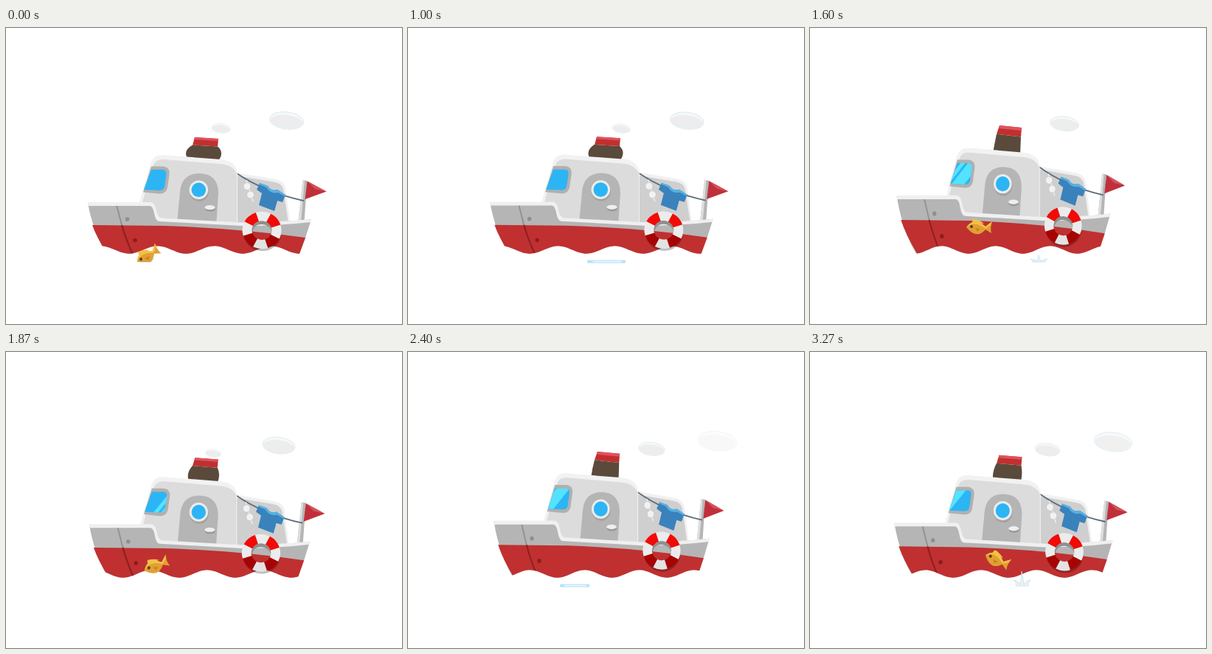
An HTML page that plays this animation: 537x401 px, repeating every 3340 ms.

```html
<!DOCTYPE html>
<html lang="en">
<head>
<meta charset="utf-8">
<title>Little boat</title>
<style>
  html, body { margin: 0; width: 100%; height: 100%; overflow: hidden; background: #fff; }
  svg { display: block; width: 100vw; height: 100vh; }
</style>
</head>
<body>
<svg viewBox="0 0 537 401" xmlns="http://www.w3.org/2000/svg">
  <defs>
    <clipPath id="water"><path id="waves"/></clipPath>
    <clipPath id="glass"><path d="M197 192H212Q218 192 217.500 198L215 215Q214 220 208 220L187 219Z"/></clipPath>
    <clipPath id="above"><rect width="537" height="317"/></clipPath>
    <g id="puff">
      <ellipse rx="1" ry=".5" fill="#f8f8f8" stroke="#c4e4f4" stroke-width=".03"/>
      <ellipse cx=".01" cy=".07" rx=".95" ry=".4" fill="#ededed"/>
    </g>
  </defs>

  <g id="smoke"></g>
  <path id="stack" fill="#5a4a3c"/>
  <path id="cap" fill="#c0302f"/>
  <path id="lip" fill="#e0525e"/>

  <g id="upper">
    <!-- aft deck -->
    <path d="M312 196L366 205Q377 207 379 217L385 262H312Z" fill="#f0f0f0"/>
    <path d="M312 200L363 208.500Q374 210 376 219L383 264H312Z" fill="#cfcfcf"/>
    <!-- flag -->
    <path d="M402.500 206L408.500 207L404.500 261H396.500Z" fill="#b5b5b5"/>
    <path d="M402.500 206H405L400 261H396.500Z" fill="#dedede"/>
    <path d="M408.500 207.500L434.500 221.500L405.500 232Z" fill="#c0303a"/>
    <path d="M408.500 207.500L434.500 221.500L419 218Z" fill="#d4515a"/>
    <!-- washing line -->
    <path d="M313 197Q352 223 404 234" fill="none" stroke="#5b6c78" stroke-width="1.800"/>
    <g fill="#f2f2f2" stroke="#c2c2c2" stroke-width=".7">
      <path d="M326 206L335 235" fill="none" stroke="#efefef" stroke-width="1.600"/>
      <circle cx="327" cy="214.500" r="5"/>
      <circle cx="331.500" cy="226" r="5"/>
    </g>
    <path d="M344 210L355 214Q360 222 368 219L379 226L375 236L368 234L364 248L343 240L347 224L340 219Z" fill="#3a82bc"/>
    <path d="M344 210L355 214Q360 222 368 219L379 226L378 228L369 223Q358 225 353 216L343.500 212Z" fill="#54b2e4"/>
    <!-- cabin -->
    <path d="M180 239L196 184Q200 171 213 172L291 178Q314 180 314 199V268H204Z" fill="#f2f2f2"/>
    <path d="M184 239L199 188Q202 177 214 178L289 184Q307 185 313 197V268H204Z" fill="#dcdcdc"/>
    <path d="M197 187.500H212Q223 188 221.500 199L219 216Q217 225 208 224.500L186 222.500Z" fill="#b0b0b0"/>
    <g clip-path="url(#glass)">
      <rect x="180" y="185" width="45" height="40" fill="#2bb5f5"/>
      <g id="glare" fill="#54e3ff">
        <rect x="-7" y="-40" width="14" height="80"/>
        <rect x="-15" y="-40" width="5" height="80"/>
      </g>
    </g>
    <path d="M232 264L236 222Q238 197 263 197Q288 198 288 224L285 268Z" fill="#b5b5b5"/>
    <circle cx="262" cy="222" r="13" fill="#a3a3a3"/>
    <circle cx="261.300" cy="219.300" r="12.800" fill="#ececec"/>
    <circle cx="261.300" cy="219.300" r="9.800" fill="#2bb5f5"/>
    <ellipse cx="277" cy="245.500" rx="7" ry="3" fill="#999"/>
    <ellipse cx="276.500" cy="243" rx="7" ry="3" fill="#efefef"/>
  </g>

  <g clip-path="url(#water)">
    <g id="hull">
      <path d="M111 237H197Q202 238 204 248Q206 258 211 258L320 264Q370 264 414 259L406 284L395 313H141Q119 282 111 237Z" fill="#b5b5b5"/>
      <path d="M117 267L215 268Q320 271.500 406 284L395 314H143Q124 287 117 267Z" fill="#c03030"/>
      <path d="M150 240L157 267" stroke="#929292" stroke-width="2"/>
      <path d="M157 267Q163 288 174 311" fill="none" stroke="#8f2020" stroke-width="2.200"/>
      <circle cx="164.500" cy="259" r="2.800" fill="#8f8f8f"/>
      <circle cx="175" cy="287.500" r="2.800" fill="#8f1c1c"/>
      <path d="M111 236H197Q202 237 204 247Q206 257 211 257.500L320 263.500Q370 263 414 259L413 263Q370 268 320 268L208 262Q203 262 201 251Q199 241 195 241H111.500Z" fill="#f0f0f0"/>
    </g>
  </g>
  <g id="ring"></g>

  <g id="ripple">
    <rect x="-.5" y="314.500" width="1" height="4" rx=".04" fill="#b5e2f9"/>
    <rect x="-.36" y="315.800" width=".76" height="1.400" rx=".04" fill="#f4fbff"/>
  </g>
  <g fill="#f0f0f0" stroke="#b9dff2" stroke-width=".7">
    <path id="dive"/>
    <path id="leap"/>
  </g>
  <g clip-path="url(#above)">
    <g id="fish">
      <path d="M-10 -5Q-10 -11 -7 -10Q0 -9 6 -4Z" fill="#f3c245"/>
      <path d="M-18 1Q-7 -14 8 0L17 -7Q14 1 16 9L8 4Q-4 18 -18 1Z" fill="#e0a034"/>
      <path d="M-18 1Q-7 -14 8 0L17 -7L15 -2L8 3Q-6 -9 -18 1Z" fill="#f3c245"/>
      <path d="M-6 2L1 3L-3 7Z" fill="#c98420"/>
      <circle cx="-11" cy="0" r="2" fill="#5a3c14"/>
    </g>
  </g>
</svg>

<script>
const LOOP = 3340, STEP = 1000 / 15;
const BOB = 14.4, JUMP = 2 * BOB;
const TAU = Math.PI * 2;
const el = id => document.getElementById(id);
const set = (id, name, value) => el(id).setAttribute(name, value);
const move = (id, value) => set(id, 'transform', value);
const show = (id, on) => { el(id).style.display = on ? '' : 'none'; };
const mix = (a, b, k) => a + (b - a) * k;
const mod = (a, n) => ((a % n) + n) % n;

// lifebuoy: eight alternating segments around an elliptical hole
function buildRing() {
  const at = (r, a) => `${r * Math.cos(a)} ${r * Math.sin(a) * 0.95}`;
  let out = '<ellipse cx="1" cy="3.500" rx="19.500" ry="18.500" fill="none" stroke="#000" stroke-opacity=".25" stroke-width="12"/>' +
    '<path d="M-14 0A14 13 0 0 1 14 0Q9 -8 0 -8Q-9 -8 -14 0Z" fill="#8f8f8f"/>';
  for (let i = 0; i < 8; i++) {
    const a = (i - 0.5) * TAU / 8, b = a + TAU / 8;
    const low = i > 0 && i < 4;
    const fill = i % 2 ? (low ? '#a60404' : '#f20a06') : (low ? '#e3e3e3' : '#ececec');
    out += `<path fill="${fill}" d="M${at(26.5, a)}A26.5 25.2 0 0 1 ${at(26.5, b)}L${at(13.5, b)}A13.5 12.8 0 0 0 ${at(13.5, a)}Z"/>`;
  }
  el('ring').innerHTML = out;
}

function buildSmoke() {
  el('smoke').innerHTML = '<use href="#puff"/>'.repeat(2);
}

// skips the two short stalls near the start
function tick(t) {
  const n = Math.min(49, Math.floor(t / STEP + 0.06));
  if (n === 6 || n === 7) return 5;
  return n < 9 ? n : n - 1;
}

function drawStack(s) {
  const p = (x0, y0, x1, y1) => `${mix(x0, x1, s)} ${mix(y0, y1, s)}`;
  const bulge = 10 * (1 - s) ** 2;
  const tl = p(256, 148, 257, 132), tr = p(288, 150, 287, 135);
  const br = p(287, 160.500, 286, 147.500), bl = p(253, 158.500, 253, 143.500);
  const left = `${mix(248, 250.500, s) - bulge} ${mix(167, 156, s)}`;
  const right = `${mix(287, 285.500, s) + bulge} ${mix(169, 158, s)}`;
  set('stack', 'd', `M${bl}L${br}Q${right} ${p(287, 181, 285, 172)}L${p(248, 179, 248, 169)}Q${left} ${bl}Z`);
  set('cap', 'd', `M${tl}L${tr}L${br}L${bl}Z`);
  set('lip', 'd', `M${tl}L${tr}L${p(287.700, 153, 286.700, 139)}L${p(255, 151, 256, 136)}Z`);
}

function drawWaves(phase) {
  let d = 'M100 200';
  for (let x = 100; x <= 424; x += 4) {
    d += `L${x} ${300.5 + 5.2 * Math.cos(TAU * ((x - 167) / 77 - phase))}`;
  }
  set('waves', 'd', d + 'V200Z');
}

function drawSmoke(n) {
  const gap = 89, base = 276 + mod(15.5 + 6.2 * n, gap);
  [...el('smoke').children].forEach((puff, i) => {
    const x = base + i * gap;
    const r = 25.5 * Math.sqrt((x - 254) / 154);
    puff.setAttribute('transform', `translate(${x} ${136 - 0.118 * (x - 291)}) rotate(7) scale(${r})`);
    puff.style.opacity = Math.max(0, Math.min(1, (427 - x) / 20));
  });
}

function drawSplash(id, age, life, x, peak) {
  const on = age > 0 && age < life;
  show(id, on);
  if (!on) return;
  const h = peak * Math.sin(Math.PI * age / life);
  const y = k => 317 - h * k;
  set(id, 'd', `M${x - 9} 317Q${x - 7} ${y(0.2)} ${x - 12} ${y(0.4)}Q${x - 4} ${y(0.3)} ${x - 3} ${y(0.1)}` +
    `Q${x - 1} ${y(0.5)} ${x - 1} ${y(1)}Q${x + 1} ${y(0.5)} ${x + 2} ${y(0.1)}` +
    `Q${x + 5} ${y(0.35)} ${x + 11} ${y(0.42)}Q${x + 7} ${y(0.2)} ${x + 8} 317Z`);
}

function drawFish(n) {
  const p = mod(n, JUMP);
  const u = (p < 2 ? p + JUMP : p) - 23;
  show('fish', u > -8.5 && u < 7);
  move('fish', `translate(${230 - 6.55 * u} ${269 + 0.686 * u + 1.01 * u * u}) rotate(${-6 * u})`);

  const dive = mod(p + 0.8, JUMP);
  drawSplash('dive', dive, 6.5, 186 + 4.5 * dive, 28);
  drawSplash('leap', p - 15.8, 8.5, 288 + 6 * (p - 19.2), 21);

  show('ripple', p > 1 && p < 16);
  move('ripple', `translate(${192 + 5.5 * p} 0) scale(${30 + 1.55 * p} 1)`);
}

function draw(t) {
  const n = tick(t);
  const phase = n / BOB;
  const s = ((1 - Math.cos(TAU * (phase - 0.07))) / 2 - 0.05) / 0.95;
  const sx = 1 - 0.044 * s;

  // squash and stretch
  move('hull', `translate(262 ${290 - 5.3 * s}) scale(${sx} ${1 + 0.075 * s}) translate(-262 -290)`);
  move('upper', `translate(262 ${219 - 8.2 * s}) scale(${sx} ${1 + 0.03 * s}) translate(-262 -219)`);
  move('waves', `translate(262 0) scale(${sx} 1) translate(-262 0)`);
  move('ring', `translate(${262 + 85 * sx} ${274 - 6 * s}) scale(${sx} ${1 + 0.02 * s}) rotate(5)`);

  const sweep = (mod(phase, 1) - 0.5) * 58;
  move('glare', `translate(${202 + sweep * 0.75} ${206 + sweep * 0.65}) rotate(40)`);
  show('glare', mod(phase, 1) > 0.1 && mod(phase, 1) < 0.9);

  drawStack(s);
  drawWaves(phase);
  drawSmoke(n);
  drawFish(n);
}

buildRing();
buildSmoke();
const start = performance.now();
function loop() {
  draw((performance.now() - start) % LOOP);
  requestAnimationFrame(loop);
}
loop();
</script>
</body>
</html>
```
